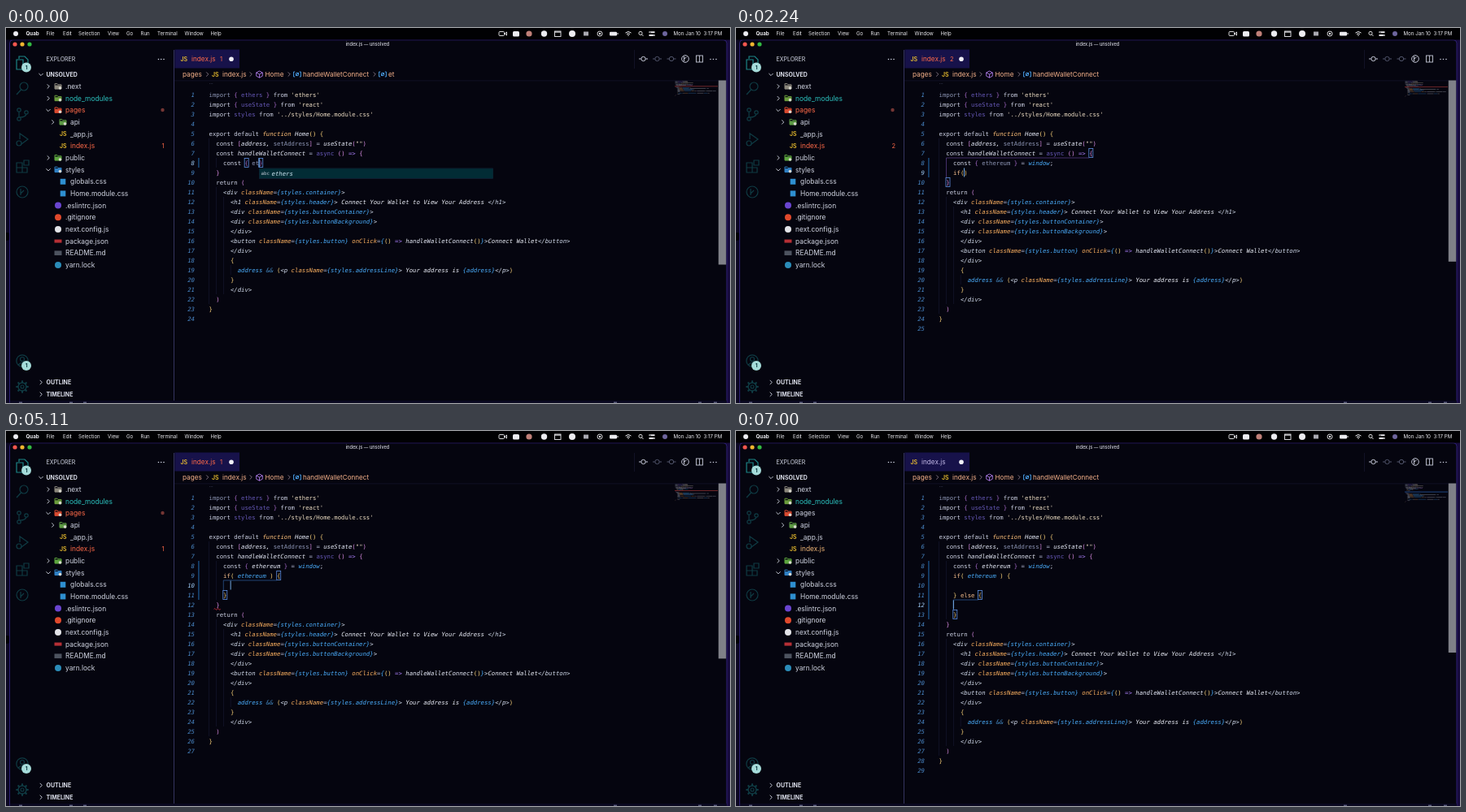
An HTML page for the animation above (7070 ms loop, 890 by 462 pixels).

```html
<!DOCTYPE html>
<html lang="en">
<head>
<meta charset="utf-8">
<title>Editor session</title>
<style>
html, body { margin: 0; width: 100%; height: 100%; overflow: hidden; background: #05050f; }
svg { display: block; width: 890px; height: 462px; font-family: Inter, Roboto, sans-serif; }
text { white-space: pre; }
.mono { font-family: "DejaVu Sans Mono", "Liberation Mono", monospace; font-size: 7.3px; }
.it { font-style: italic; }
</style>
</head>
<body>
<svg viewBox="0 0 890 462"><g id="shell"></g><g id="live"></g></svg>
<script>
const LOOP = 7070, CW = 4.396, LEFT = 249.5;
const X = col => LEFT + col * CW;
const Y = line => 82 + 12 * (line - 1);
const esc = s => s.replace(/&/g, '&amp;').replace(/</g, '&lt;');

// drawing helpers
const BG = '#05050f';
const rect = (x, y, w, h, fill, more = '') => `<rect x="${x}" y="${y}" width="${w}" height="${h}" fill="${fill}" ${more}/>`;
const disc = (x, y, r, fill) => `<circle cx="${x}" cy="${y}" r="${r}" fill="${fill}"/>`;
const path = (d, color, w = 1) => `<path d="${d}" fill="none" stroke="${color}" stroke-width="${w}"/>`;
const ring = (x, y, r, color, w = 1) => `<circle cx="${x}" cy="${y}" r="${r}" fill="none" stroke="${color}" stroke-width="${w}"/>`;
const label = (x, y, s, size, fill, more = '') =>
  `<text x="${x}" y="${y + size * 0.36}" font-size="${size}" fill="${fill}" ${more}>${esc(s)}</text>`;
const chevron = (x, y, color, open) =>
  path(open ? `M${x - 2.6} ${y - 1.3}l2.6 2.6l2.6 -2.6` : `M${x - 1.3} ${y - 2.6}l2.6 2.6l-2.6 2.6`, color, 0.9);
const js = (x, y) => label(x, y, 'JS', 7, '#f2c42f', 'font-weight="600"');
const varIcon = (x, y) =>
  path(`M${x - 2.8} ${y - 3}h-1.6v6h1.6M${x + 2.8} ${y - 3}h1.6v6h-1.6M${x - 2} ${y + 2}l4 -4`, '#4fa9f5', 0.9) + ring(x, y, 1.8, '#4fa9f5', 0.9);
const cube = (x, y) =>
  path(`M${x} ${y - 4}l3.8 2v4.2l-3.8 2l-3.8 -2v-4.2zM${x - 3.8} ${y - 2}l3.8 2l3.8 -2M${x} ${y}v4.2`, '#ae7be8', 0.9);
const wordIcon = (x, y) => path(`M${x - 4} ${y - 3}h4m1.5 0h3M${x - 4} ${y}h2m1.5 0h5M${x - 4} ${y + 3}h5m1.5 0h2`, '#b9bfd2', 1.2);
const snipIcon = (x, y) => path(`M${x - 4} ${y - 2}h5l3 4h-4zM${x - 2} ${y - 2}v4h2`, '#ee9a3a', 1);

const INK = {
  k: '#ccd0e2', m: '#a56bc8', d: '#6457b4', s: '#ecdcc2', f: '#ffc07a', h: '#e6eaf7',
  y: '#f7cf78', p: '#d58be0', g: '#8b93b2', w: '#b4b9d2', v: '#a67cf2', i: '#f5bd8c',
  t: '#d3dcec', a: '#fbb060', b: '#4aacfa', x: '#eceff8', o: '#4488c0'
};
const SLANT = 'taxbofh';
const attr = name => `~aclassName~w=~b{styles.${name}}~t>`;
const HEAD = [
  "~gimport ~m{ ~dethers ~m} ~kfrom ~s'ethers'",
  "~kimport ~m{ ~duseState ~m} ~kfrom ~s'react'",
  "~kimport ~dstyles ~kfrom ~s'../styles/Home.module.css'",
  '',
  '~kexport default ~ffunction ~hHome~y() {',
  '~k  const ~p[~haddress, ~gsetAddress~p] ~w= ~huseState~p(~s""~p)',
  '~k  const ~hhandleWalletConnect ~w= ~dasync ~p() ~v=> ~p{'
];
const TAIL = [
  '~p  }',
  '~k  return ~p(',
  '~t    <div ' + attr('container'),
  '~t      <h1 ' + attr('header') + '~x Connect Your Wallet to View Your Address ~t</h1>',
  '~t      <div ' + attr('buttonContainer'),
  '~t      <div ' + attr('buttonBackground'),
  '~t      </div>',
  '~t      <button ~aclassName~w=~b{styles.button} ~aonClick~w=~b{~y() ~v=> ~hhandleWalletConnect~y()~b}~t>~xConnect Wallet~t</button>',
  '~t      </div>',
  '~y      {',
  '~b        address ~o&& ~y(~t<p ' + attr('addressLine') + '~x Your address is ~b{address}~t</p>~y)',
  '~y      }',
  '~t      </div>',
  '~p  )',
  '~y}',
  ''
];

function tokens(src) {
  let col = 0;
  return src.split('~').slice(1).map(part => {
    const s = part.slice(1), body = s.trimStart();
    const tok = { ink: part[0], body, col: col + s.length - body.length };
    col += s.length;
    return tok;
  }).filter(t => t.body);
}
const textRow = (src, n) => tokens(src).map(t =>
  `<text x="${X(t.col)}" y="${Y(n) + 2.6}" fill="${INK[t.ink]}"${SLANT.includes(t.ink) ? ' class="it"' : ''}>${esc(t.body)}</text>`).join('');

// suggestion lists: icon, text, detail, struck
const LISTS = {
  word: [['abc', 'ethers']],
  eth: [
    ['v', 'ethereum', 'const ethereum: any'], ['v', 'ethers'], ['v', 'EtherscanProvider', '@ethersproject/providers'],
    ['c', 'entropyToMnemonic', '@ethersproject/hdnode'], ['v', 'EventTarget'], ['k', 'extends'],
    ['v', 'external', '', 1], ['v', 'event', '', 1], ['v', 'External', '', 1],
    ['k', 'export'], ['v', 'exports'], ['c', 'parseEther', '@ethersproject/units']
  ],
  els: [
    ['k', 'else', 'else'], ['s', 'ESLint', 'eslint'], ['c', 'addEventListener'], ['v', 'MediaElementAudioSourceNode'],
    ['v', 'customElements'], ['c', 'removeEventListener'], ['v', 'CustomElementRegistry'], ['v', 'PerformanceObserverEntryList']
  ]
};
const ICONS = { v: varIcon, c: cube, k: wordIcon, s: snipIcon, abc: (x, y) => label(x - 5, y, 'abc', 5.8, '#c5cad8') };

function popup(name, line, col) {
  const rows = LISTS[name], x = X(col) + 0.5, y = Y(line) + 7;
  let out = rect(x, y, 287, rows.length * 12 + 0.5, '#06071a', 'stroke="#15283c" stroke-width=".7"') + rect(x, y + 0.3, 287, 11.7, '#022c35');
  rows.forEach(([icon, text, detail, struck], i) => {
    const cy = y + 6 + 12 * i;
    out += ICONS[icon](x + 7, cy);
    out += label(x + 15, cy, text, 7.3, i ? '#4db2ee' : '#cfe6f2', 'class="it"' + (struck ? ' text-decoration="line-through" opacity=".75"' : ''));
    if (detail) out += label(x + 280, cy, detail, 6.2, i ? '#3f86c4' : '#c9a878', 'class="it" text-anchor="end"');
  });
  if (name === 'eth') out += rect(x + 280.5, y + 0.5, 6, 12.5, '#6c7078');
  return out;
}

// timeline
const decl = s => '~k    const ~m{ ~g' + s;
const FADED = decl('ethereum ~m} ~w= ~bwindow~k;');
const USED = '~k    const ~m{ ~hethereum ~m} ~w= ~bwindow~k;';
const cond = s => '~i    if~y(~b' + s;
const outer = end => [7, 42, end, 2];
const inIf = s => [FADED, cond(s + '~y)')];
const IF = cond(' ethereum ~y)'), OPEN = IF + ' {';
const block = last => [USED, OPEN, '', '~y    }~i' + last];
const round = col => [9, 6, 9, col];
const curly = [9, 19, 11, 4];
const done = [...block(' else ~y{'), '', '~y    }'];

// each step: time, lines, caret [line, column], bracket pair, extras
const STEPS = [
  [0, [decl('et~m}')], [8, 14], [8, 10, 8, 14], { pop: 'word', err: 1, crumb: 'et' }],
  [70, [decl('eth~m}')], [8, 15], [8, 10, 8, 15], { pop: 'word', err: 1, crumb: 'eth' }],
  [140, [decl('ethereum~m}')], [8, 20], [8, 10, 8, 20], { err: 1 }],
  [210, [decl('ethereum ~m}')], [8, 22], [8, 10, 8, 21], { err: 1 }],
  [280, [decl('ethereum ~m} ~w= ~bwin')], [8, 28], outer(9), { err: 1 }],
  [350, [FADED], [8, 32], outer(9), {}],
  [420, [FADED, ''], [9, 4], outer(10), {}],
  [560, [FADED, ''], [9, 4], outer(10), { off: 1 }],
  [770, [FADED, ''], [9, 4], outer(10), {}],
  [980, [FADED, ''], [9, 4], outer(10), { off: 1 }],
  [1050, [FADED, ''], [9, 4], outer(10), {}],
  [1330, [FADED, ''], [9, 4], outer(10), { off: 1 }],
  [1470, [FADED, '~i    i'], [9, 5], outer(10), {}],
  [1610, [FADED, '~i    if'], [9, 6], outer(10), {}],
  [1820, inIf(''), [9, 7], round(7), {}],
  [2100, inIf(''), [9, 7], outer(10), { err: 2 }],
  [2450, inIf(' '), [9, 8], round(8), { err: 2 }],
  [2800, inIf(' e'), [9, 9], round(9), { pop: 'eth', err: 2, wavy: 1 }],
  [2940, inIf(' et'), [9, 10], round(10), { pop: 'eth', err: 2, wavy: 1 }],
  [3430, inIf(' eth'), [9, 11], round(11), { pop: 'eth', err: 2, wavy: 1 }],
  [3500, [USED, cond(' ethereum~y)')], [9, 16], round(16), { err: 2, wavy: 1 }],
  [3640, [USED, IF], [9, 17], round(17), { err: 2, wavy: 1 }],
  [3710, [USED, IF], [9, 18], round(17), { err: 2, wavy: 1 }],
  [3850, [USED, IF], [9, 18], round(17), { err: 1, wavy: 1 }],
  [3990, [USED, IF], [9, 19], outer(10), { err: 1, wavy: 1 }],
  [4270, [USED, IF], [9, 19], outer(10), { err: 1, wavy: 1, off: 1 }],
  [4480, [USED, IF], [9, 19], outer(10), { err: 1, wavy: 1 }],
  [4690, [USED, OPEN + '}'], [9, 20], [9, 19, 9, 20], { err: 1, wavy: 1 }],
  [4830, block(''), [10, 6], curly, { err: 1, wavy: 1 }],
  [5250, block(''), [11, 5], curly, { err: 1, wavy: 1 }],
  [5390, block(''), [11, 5], curly, {}],
  [5600, block(''), [11, 5], curly, { off: 1 }],
  [5740, block(' '), [11, 6], outer(12), {}],
  [5880, block(' e'), [11, 7], outer(12), { pop: 'els' }],
  [5950, block(' el'), [11, 8], outer(12), { pop: 'els' }],
  [6020, block(' els'), [11, 9], outer(12), { pop: 'els' }],
  [6090, block(' else'), [11, 10], outer(12), { pop: 'els' }],
  [6230, block(' else '), [11, 11], outer(12), {}],
  [6300, block(' else ~y{}'), [11, 12], [11, 11, 11, 12], {}],
  [6440, done, [12, 4], [11, 11, 13, 4], {}]
];

function pairMarks([l1, c1, l2, c2]) {
  const color = c2 === 2 ? '#5d3f8c' : '#2f5f9e';
  const box = (l, c) => rect(X(c) - 0.3, Y(l) - 5.5, CW + 0.6, 11, 'none', 'stroke="#5f8fe0" stroke-width=".8"');
  const guide = l1 === l2 ? '' : path(`M${X(c2) + 0.2} ${Y(l2) - 6}V${Y(l1) + 6}H${X(c1)}`, color, 0.7);
  return guide + box(l1, c1) + box(l2, c2);
}

function guides(lines) {
  let out = '', depth = 0;
  lines.forEach((src, i) => {
    depth = tokens(src)[0]?.col ?? depth;
    for (let c = 0; c < depth; c += 2) out += rect(X(c), Y(i + 1) - 6, 0.5, 12, '#1b1c38');
  });
  return out;
}

function minimap(lines, active, err) {
  let out = '';
  lines.forEach((src, i) => tokens(src).forEach(t => {
    out += rect(822.5 + t.col * 0.5, 65.5 + i * 0.8, t.body.length * 0.47, 0.55, INK[t.ink], 'opacity=".45"');
  }));
  return out + rect(822, 65 + active * 0.8, 53, 0.9, err ? '#7a2a2c' : '#214d8c');
}

function live([, mid, [line, col], pair, { pop, err, crumb, off, wavy }]) {
  const lines = [...HEAD, ...mid, ...TAIL], red = '#ff6a48';
  let out = guides(lines);
  lines.forEach((src, i) => {
    const n = i + 1;
    out += `<text x="232" y="${Y(n) + 2.6}" class="it" text-anchor="end" fill="${n === line ? '#a0cdf8' : '#4a88c8'}">${n}</text>` + textRow(src, n);
  });
  out += rect(236.3, Y(8) - 6, 1.2, mid.length * 12, '#1d5c96') + pairMarks(pair);
  if (wavy) out += path(`M${X(1.4)} ${Y(8 + mid.length) + 5.5}q1 -1.6 2 0t2 0t2 0t2 0`, '#d8313c', 0.9);
  if (!off) out += rect(X(col) - 0.2, Y(line) - 5.5, 0.9, 11, '#7fb8f5');
  if (pop) out += popup(pop, line, col);
  out = `<g class="mono">${out}</g>` + minimap(lines, line, err);

  // the scroll thumb shrinks as lines are added
  out += rect(875.8, 64.5, 9.4, 227 - 3.7 * (lines.length - 24), '#7f8088');
  out += label(228, 38.2, 'index.js', 8.2, err ? red : '#c3b9e8');
  out += label(73, 101.2, 'pages', 8.4, err ? red : '#d2d6e3');
  out += label(79, 145.2, 'index.js', 8.4, err ? red : '#f3b878');
  if (err) out += label(263, 38.2, '' + err, 7.5, red) + label(191.5, 145.2, '' + err, 7.5, red) + disc(192.5, 101, 2.2, '#743634');
  if (crumb) out += chevron(453, 57, '#8a7a88') + varIcon(463, 57) + label(470, 57, crumb, 8.2, '#f7b28a');
  return out;
}

function menuBar() {
  const white = '#ececf0';
  let out = rect(0, 0, 890, 14.5, '#010103') + disc(12, 7, 3, white) + label(24.5, 7, 'Quab', 6.2, white, 'font-weight="700"');
  [[49.5, 'File'], [70, 'Edit'], [89, 'Selection'], [125, 'View'], [148, 'Go'], [165.5, 'Run'], [186, 'Terminal'], [219.5, 'Window'], [251.5, 'Help']]
    .forEach(([x, s]) => out += label(x, 7, s, 6.1, white));
  out += rect(606, 4.5, 6.5, 5, 'none', `stroke="${white}" stroke-width=".9" rx="1"`) + path('M613 7l2.5 -2v4z', white, 0.9);
  out += rect(623, 4, 8, 6.5, white, 'rx="1.6"') + disc(643, 7, 3.6, '#c08078') + disc(661.5, 7, 3.7, white);
  out += rect(674.5, 4, 7.5, 6.5, 'none', `stroke="${white}" stroke-width=".9"`) + path('M674.5 5h7.5', white, 1.2);
  out += disc(696, 7, 4, white) + rect(710, 4.5, 6, 5, '#a8a8b0') + ring(730, 7, 3, white, 0.9) + disc(730, 7, 1.2, white);
  out += rect(742, 4.7, 9, 4.8, white, 'rx="1.3"') + rect(751.5, 6, 1, 2, white);
  out += path('M761.5 6q3.5 -3 7 0M763 7.6q2 -1.6 4 0', white, 1) + disc(765, 9, 0.8, white);
  out += ring(780, 6.4, 2.1, white, 0.9) + path('M781.5 8l2 2', white, 0.9);
  out += path('M790.5 5.2h7M790.5 9h7', white, 1.8) + disc(792, 5.2, 0.6, '#000') + disc(796, 9, 0.6, '#000') + disc(810, 7, 3, '#6d659c');
  return out + label(820.5, 7, 'Mon Jan 10  3:17 PM', 6.2, white);
}

function activityBar() {
  const dim = '#0f3b43', lit = '#1c8586';
  const badge = y => disc(25, y, 6, '#a5dcda') + label(23.7, y, '1', 6.5, '#0b3a40', 'font-weight="700"');
  let out = path('M16 38v-3h7l4 4v9h-5M13 39h8v12h-8z', lit, 1.2) + badge(48.5);
  out += ring(22, 72, 5, dim, 1.2) + path('M18.5 76l-5.5 6', dim, 1.3);
  out += ring(16, 101, 2.2, dim, 1.2) + ring(16, 112, 2.2, dim, 1.2) + ring(25, 104, 2.2, dim, 1.2) + path('M16 103v7M25 106q-1 4 -8 4', dim, 1.2);
  out += path('M17 137v-7l10 7l-8 6', dim, 1.2) + ring(16, 142, 3, dim, 1.2);
  out += path('M13 166h7v12h-7zM13 172h13v6h-7M22 163h6v6h-6z', dim, 1.2);
  out += ring(20, 202, 7, dim, 1.2) + path('M18 198v8M22 200l-4 4', dim, 1.2);
  out += ring(20, 410, 7.2, dim, 1.2) + ring(20, 408, 2.5, dim, 1.2) + path('M15 415q5 -5 10 0', dim, 1.2) + badge(416);
  out += ring(20, 442, 5, dim, 1.4) + ring(20, 442, 2, dim, 1.1);
  for (let a = 0; a < 8; a++) out += rect(19, 434.3, 2, 3, dim, `transform="rotate(${a * 45} 20 442)"`);
  return out;
}

function sideBar() {
  const grey = '#d2d6e3';
  const folder = (x, y, c) => path(`M${x - 4} ${y + 3}v-6.4h3l1 1.2h4v5.2z`, c, 1) + rect(x - 4, y - 1.5, 8, 4.8, c, 'rx=".6"') + disc(x + 2.5, y + 2, 1.8, '#d8d8d0');
  const square = (x, y, c) => rect(x - 3.3, y - 3.5, 6.6, 7, c);
  const dot = (x, y, c) => disc(x, y, 4, c);
  // name, level, icon, colour, chevron (1 closed, 2 open)
  const rows = [
    ['.next', 0, folder, '#8b877c', 1], ['node_modules', 0, folder, '#6a9c3c', 1], ['', 0, folder, '#d8492f', 2],
    ['api', 1, folder, '#5c9a44', 1], ['_app.js', 1], ['', 1], ['public', 0, folder, '#5ca43e', 1], ['styles', 0, folder, '#2f7fc2', 2],
    ['globals.css', 1, square, '#2e8fd0'], ['Home.module.css', 1, square, '#2e8fd0'], ['.eslintrc.json', 0, dot, '#6a45d0'],
    ['.gitignore', 0, dot, '#e0492c'], ['next.config.js', 0, dot, '#e3e4e8'],
    ['package.json', 0, (x, y, c) => rect(x - 4.5, y - 2, 9, 4, c), '#b52f35'],
    ['README.md', 0, (x, y, c) => rect(x - 4.5, y - 2.8, 9, 5.6, c), '#4d535f'], ['yarn.lock', 0, dot, '#2b8cb8']
  ];
  let out = label(49.5, 38, 'EXPLORER', 7, grey) + [187.5, 190.7, 194].map(x => disc(x, 38.5, 0.8, grey)).join('');
  out += chevron(43, 57.3, grey, true) + label(49.5, 57.3, 'UNSOLVED', 7, '#dcdfea', 'font-weight="700"');
  rows.forEach(([name, lvl, icon, color, chev], i) => {
    const y = 72 + 14.66 * i, x = 64 + 6 * lvl;
    if (chev) out += chevron(52 + 5.5 * lvl, y, grey, chev === 2);
    out += icon ? icon(x, y, color) : js(x - 4, y);
    if (name) out += label(73 + 6 * lvl, y, name, 8.4, name === 'node_modules' ? '#2cc4c0' : grey);
  });
  [['OUTLINE', 436.5], ['TIMELINE', 451.3]].forEach(([s, y]) =>
    out += chevron(43, y, grey) + label(49.5, y, s, 7, '#dcdfea', 'font-weight="700"'));
  return out;
}

function editorFrame() {
  const c = '#c6c9d8', crumb = '#f7b28a', gap = '#8a7a88';
  let out = rect(206, 27, 1, 432, '#34345e') + rect(207.5, 26.5, 79.5, 23, '#17124a') + js(214.5, 38) + disc(277, 38.2, 2.8, '#f0f0f6');
  out += rect(207, 64.5, 669, 0.8, '#12122a') + label(249.5, 69, '···', 6, '#6d7290');
  out += label(217, 57, 'pages', 8.2, crumb) + chevron(247.5, 57, gap) + js(253, 57) + label(266, 57, 'index.js', 8.2, crumb);
  out += chevron(301, 57, gap) + cube(311.5, 57) + label(318.5, 57, 'Home', 8.2, crumb);
  out += chevron(348, 57, gap) + varIcon(358, 57) + label(365, 57, 'handleWalletConnect', 8.1, crumb);
  out += rect(772, 27, 0.6, 23, '#1c1c36');
  [[783.5, c], [800.5, '#50546a'], [818, '#50546a']].forEach(([x, k]) => out += ring(x, 38, 2.7, k) + path(`M${x - 5.5} 38h2.5M${x + 3} 38h2.5`, k));
  out += ring(835, 38, 4.3, c) + path('M833.5 35v6M833.5 38l3 -2', c);
  out += rect(848.5, 34, 8, 8, 'none', `stroke="${c}" stroke-width=".9"`) + path('M852.5 34v8', c, 0.9);
  return out + [866, 869.5, 873].map(x => disc(x, 38.5, 0.8, c)).join('');
}

function shell() {
  let out = rect(0, 0, 890, 462, '#160b3c') + rect(0, 14, 5, 448, '#0c0822') + disc(1, 257, 5, '#010103');
  out += rect(4.5, 14.8, 881.5, 450, BG, 'rx="4" stroke="#37288a" stroke-width=".8"') + menuBar();
  out += disc(11, 20, 2.6, '#f5574f') + disc(20, 20, 2.6, '#f0b52f') + disc(29, 20, 2.6, '#32b943');
  out += label(444.5, 20, 'index.js — unsolved', 5.6, '#d0d1da', 'text-anchor="middle" font-weight="500"');
  out += activityBar() + sideBar() + editorFrame() + rect(5, 459, 881, 3, '#0a0920');
  [16, 78, 95, 747, 851, 870].forEach(x => out += rect(x, 460.6, 4, 1.4, '#5d6080'));
  return out;
}

document.getElementById('shell').innerHTML = shell();
const stage = document.getElementById('live'), start = performance.now();
let shown = -1;
function tick() {
  const t = (performance.now() - start) % LOOP;
  const now = STEPS.findLastIndex(s => s[0] <= t);
  if (now !== shown) stage.innerHTML = live(STEPS[shown = now]);
  requestAnimationFrame(tick);
}
tick();
</script>
</body>
</html>
```
